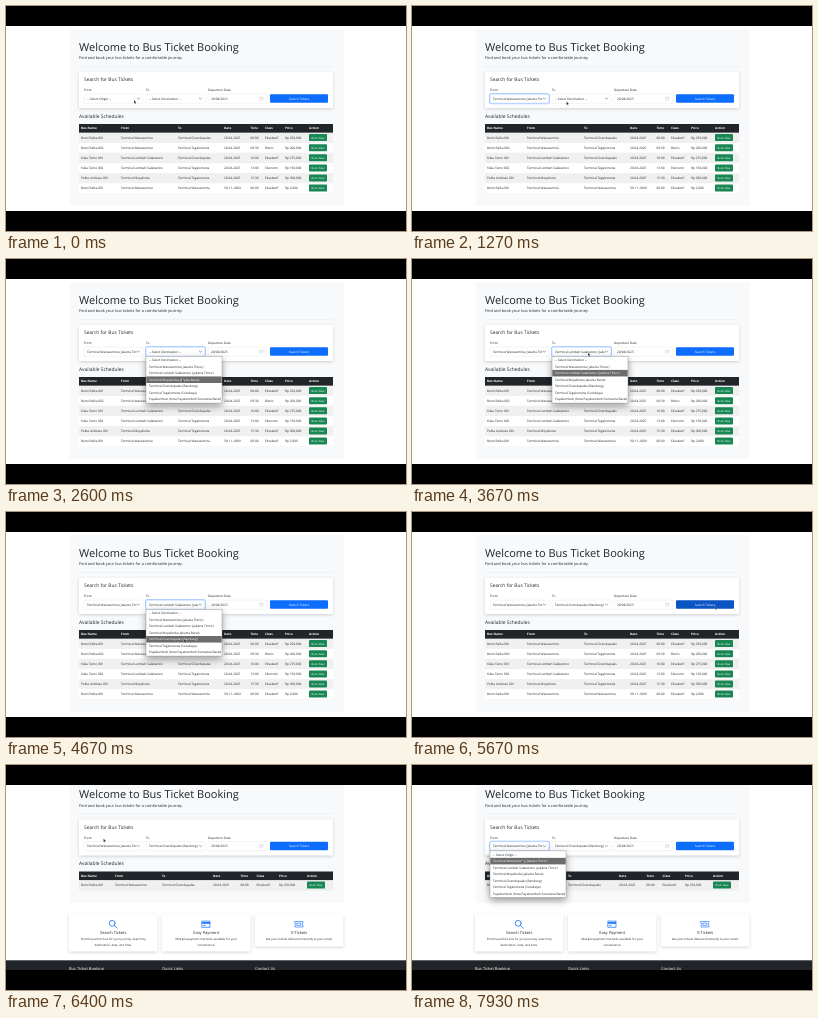
An HTML page that plays this animation: 400x225 px, repeating every 8000 ms.

```html
<!DOCTYPE html>
<html lang="en">
<head>
<meta charset="utf-8">
<title>Bus Ticket Booking</title>
<style>
  html, body { margin: 0; width: 100%; height: 100%; overflow: hidden; background: #000; }
  #stage { display: block; width: 100vw; height: 100vh; }
  text { font-family: "Open Sans", "Noto Sans", sans-serif; text-rendering: geometricPrecision; white-space: pre; }
  .raised { filter: drop-shadow(0 1.4px 1.6px rgba(0, 0, 0, .17)); }
  .floating { filter: drop-shadow(0 3.5px 3.5px rgba(0, 0, 0, .38)); }
</style>
</head>
<body>
<svg id="stage" viewBox="0 0 400 225"></svg>
<script>
const LOOP = 8000;
const SUBMIT = 5760;
const INK = '#212529', BLUE = '#0d6efd', GREEN = '#198754';

const WANA = 'Terminal Wanasemira', LEMBAH = 'Terminal Lembah Salakwono', MOYA = 'Terminal Moyalinda',
      CIRAN = 'Terminal Cirandupalas', TEGAL = 'Terminal Tegalomena';
const STOPS = [`${WANA} (Jakarta Timur)`, `${LEMBAH} (Jakarta Timur)`, `${MOYA} (Jakarta Barat)`,
  `${CIRAN} (Bandung)`, `${TEGAL} (Surabaya)`, 'Payakumbuh (Kota Payakumbuh Sumatera Barat)'];

const HEADERS = ['Bus Name', 'From', 'To', 'Date', 'Time', 'Class', 'Price', 'Action'];
const TODAY = '20-04-2025';
const TRIPS = [
  ['Bumi Relka 001', WANA, CIRAN, TODAY, '08:00', 'Eksekutif', 'Rp 250,000'],
  ['Bumi Relka 002', WANA, TEGAL, TODAY, '09:30', 'Bisnis', 'Rp 200,000'],
  ['Kilau Temo 001', LEMBAH, CIRAN, TODAY, '10:00', 'Eksekutif', 'Rp 275,000'],
  ['Kilau Temo 002', LEMBAH, TEGAL, TODAY, '13:00', 'Ekonomi', 'Rp 150,000'],
  ['Pelita Andrasu 001', MOYA, TEGAL, TODAY, '15:30', 'Eksekutif', 'Rp 300,000'],
  ['Bumi Relka 001', WANA, WANA, '30-11--0001', '00:00', 'Eksekutif', 'Rp 2,000'],
];

const FIELDS = {
  from: { x: 78, options: ['-- Select Origin --', ...STOPS] },
  to: { x: 140, options: ['-- Select Destination --', ...STOPS] },
};
const OPENINGS = [['from', 130, 880], ['to', 1420, 3150], ['to', 3550, 4900], ['from', 7000, LOOP]];

// Keyframes: time, then the values reached at that time.
const POINTER = [[0, 128, 94], [130, 128, 94], [550, 110, 106], [880, 110, 107], [1270, 154.5, 95.5],
  [1420, 160, 93], [1750, 168, 101], [2550, 176, 120], [2750, 176, 120], [3050, 174, 114], [3200, 174, 114],
  [3450, 176, 93], [3600, 176, 93], [4450, 178, 127], [4900, 178, 127], [5400, 303, 94], [5850, 303, 94],
  [6350, 97.5, 73.5], [6500, 97.5, 73.5], [6850, 112, 80], [7050, 112, 80], [7600, 110, 95]];
const SCROLL = [[5880, 0], [6300, 11.5]];

const LIST_TOP = 97.8, ITEM = 6.55;

function tween(keys, t) {
  const next = keys.findIndex(key => key[0] > t);
  if (next === 0) return keys[0].slice(1);
  if (next < 0) return keys.at(-1).slice(1);
  const a = keys[next - 1], b = keys[next];
  const p = (t - a[0]) / (b[0] - a[0]), ease = p * p * (3 - 2 * p);
  return a.slice(1).map((v, i) => v + (b[i + 1] - v) * ease);
}

const rect = (x, y, w, h, fill, more = '') =>
  `<rect x="${x}" y="${y}" width="${w}" height="${h}" fill="${fill}" ${more}/>`;
const text = (x, middle, str, size = 3.15, fill = INK, more = '') =>
  `<text x="${x}" y="${middle + size * .35}" font-size="${size}" fill="${fill}" ${more}>${str}</text>`;
const line = (d, stroke, width) =>
  `<path d="${d}" fill="none" stroke="${stroke}" stroke-width="${width}" stroke-linecap="round" stroke-linejoin="round"/>`;
const CENTER = 'text-anchor="middle"';

function input(x, focused) {
  const ring = focused ? rect(x - .5, 87.6, 60, 10.2, 'none', 'rx="1.4" stroke="#b9d5ff" stroke-width="1"') : '';
  return ring + rect(x, 88.1, 59, 9.2, '#fff', `rx="1" stroke="${focused ? '#6ea8fe' : '#dee2e6'}" stroke-width=".4"`);
}

function select({ x, options }, value, focused) {
  return input(x, focused)
    + `<svg x="${x + 3}" y="88" width="49.5" height="9.5">${text(0, 4.7, options[value])}</svg>`
    + line(`M${x + 53.4} 92.1l1.1 1.1 1.1-1.1`, '#343a40', .5);
}

function dropdown({ x, options }, active) {
  const items = options.map((label, i) => {
    const y = i * ITEM + .4, on = i === active;
    return (on ? rect(.3, y, 75.4, ITEM, '#6c6c6c') : '') + text(3, y + ITEM / 2, label, 3.15, on ? '#fff' : INK);
  }).join('');
  const height = options.length * ITEM + .8;
  return rect(x, LIST_TOP - .4, 76, height, '#fff', 'class="floating" stroke="#868686" stroke-width=".4"')
    + `<svg x="${x}" y="${LIST_TOP - .4}" width="76" height="${height}">${items}</svg>`;
}

function table(trips, columns) {
  const rows = trips.map((trip, i) => {
    const top = 126.8 + i * 10.1, mid = top + 4.8;
    return rect(73, top, 254, 10.1, i % 2 ? '#fff' : '#f0f0f1')
      + rect(73, top + 9.9, 254, .2, '#dee2e6')
      + trip.map((cell, c) => text(columns[c], mid, cell)).join('')
      + rect(columns[7], mid - 3.5, 18, 7, GREEN, 'rx=".9"')
      + text(columns[7] + 9, mid, 'Book Now', 2.7, '#fff', CENTER);
  }).join('');
  return rect(73, 118, 254, 8.8, INK)
    + HEADERS.map((h, c) => text(columns[c], 122.3, h, 3.1, '#fff', 'font-weight="700"')).join('') + rows;
}

const ICONS = [
  line('M109.1 169.8a2.9 2.9 0 1 1-5.8 0a2.9 2.9 0 1 1 5.8 0M108.4 172l2.7 2.7', BLUE, .8),
  line('M196.2 167.6h7.8v6.2h-7.8zM197.6 172h1.6', BLUE, .7) + rect(196.2, 168.6, 7.8, 1.7, BLUE),
  line('M289 168h8v1.7a1 1 0 0 0 0 2v1.8h-8v-1.8a1 1 0 0 0 0-2zM291.3 169.6h3.4v2.3h-3.4z', BLUE, .6),
];
const FEATURES = [
  [63, 'Search Tickets', ['Find the perfect bus for your journey. Search by', 'destination, date, and time.']],
  [156, 'Easy Payment', ['Multiple payment methods available for your', 'convenience.']],
  [249, 'E-Tickets', ['Get your tickets delivered instantly to your email.']],
];

function lowerPage(shift) {
  const cards = FEATURES.map(([x, title, body], i) =>
    rect(x, 160.8, 88.5, 26.9 + 5.2 * body.length, '#fff', 'rx="1.2" class="raised"')
    + ICONS[i] + text(x + 44.2, 179.2, title, 4, INK, CENTER)
    + body.map((s, n) => text(x + 44.2, 185.8 + 5.2 * n, s, 2.95, INK, CENTER)).join('')).join('');
  const footer = rect(0, 206.8, 400, 40, INK)
    + ['Bus Ticket Booking', 'Quick Links', 'Contact Us'].map((s, i) => text(63 + 93 * i, 214.6, s, 4, '#fff')).join('');
  return `<g transform="translate(0 ${shift})">${cards}${footer}</g>`;
}

function page(trips, columns) {
  const shift = (trips.length - 1) * 10.1;
  return rect(63.5, 23, 274.5, 126.5 + shift, '#f8f9fa', 'rx="1.2"')
    + text(73, 41, 'Welcome to Bus Ticket Booking', 11)
    + text(73, 52, 'Find and book your bus tickets for a comfortable journey.', 3.9)
    + rect(73, 60, 254, .25, '#d3d6d9')
    + rect(73, 66, 254, 36, '#fff', 'rx="1" class="raised"')
    + text(78, 73.4, 'Search for Bus Tickets', 4.85)
    + text(78, 84, 'From') + text(140, 84, 'To') + text(202, 84, 'Departure Date')
    + input(202, false) + text(205, 92.7, '20/04/2025')
    + line('M254 91.2h2.8v2.9H254zM254 92h2.8', '#aaa', .3)
    + text(73, 110, 'Available Schedules', 4.9)
    + table(trips, columns) + lowerPage(shift);
}

const ALL = page(TRIPS, [75, 115, 172, 218, 244.5, 259, 279, 303]);
const RESULTS = page(TRIPS.slice(0, 1), [75, 109, 156, 207, 234.5, 250.5, 273, 301]);

function view(t) {
  const [px, py] = tween(POINTER, t), [scroll] = tween(SCROLL, t);
  const values = { from: t < 880 ? 0 : 1, to: t < 3150 ? 0 : t < 4900 ? 2 : 4 };
  const open = OPENINGS.find(([, start, end]) => t >= start && t < end)?.[0];
  const focus = open ?? (t < 880 || t >= 5500 ? '' : t < 1420 ? 'from' : 'to');
  const hovering = t > 4900 && px > 264 && px < 322 && py > 87;

  const fields = Object.keys(FIELDS).map(name => select(FIELDS[name], values[name], focus === name)).join('');
  const button = rect(264, 88.3, 58, 8.5, hovering ? '#0b54c4' : BLUE, 'rx="1"')
    + text(293, 92.5, 'Search Tickets', 3.1, '#fff', CENTER);
  const row = Math.floor((py + scroll - LIST_TOP) / ITEM);
  const list = open ? dropdown(FIELDS[open], row >= 0 ? row : values[open]) : '';
  const pointer = `<path transform="translate(${px} ${py})" d="M0 0v3.4l.8-.7.6 1.3.6-.3-.6-1.2h1.1z"
    fill="#111" stroke="#fff" stroke-width=".25"/>`;

  return rect(0, 0, 400, 225, '#fff')
    + `<g transform="translate(0 ${-scroll})">${t < SUBMIT ? ALL : RESULTS}${fields}${button}${list}</g>`
    + pointer + rect(0, 0, 400, 20, '#000') + rect(0, 205, 400, 20, '#000');
}

const stage = document.getElementById('stage');
function frame() {
  stage.innerHTML = view(performance.now() % LOOP);
  requestAnimationFrame(frame);
}
frame();
</script>
</body>
</html>
```
